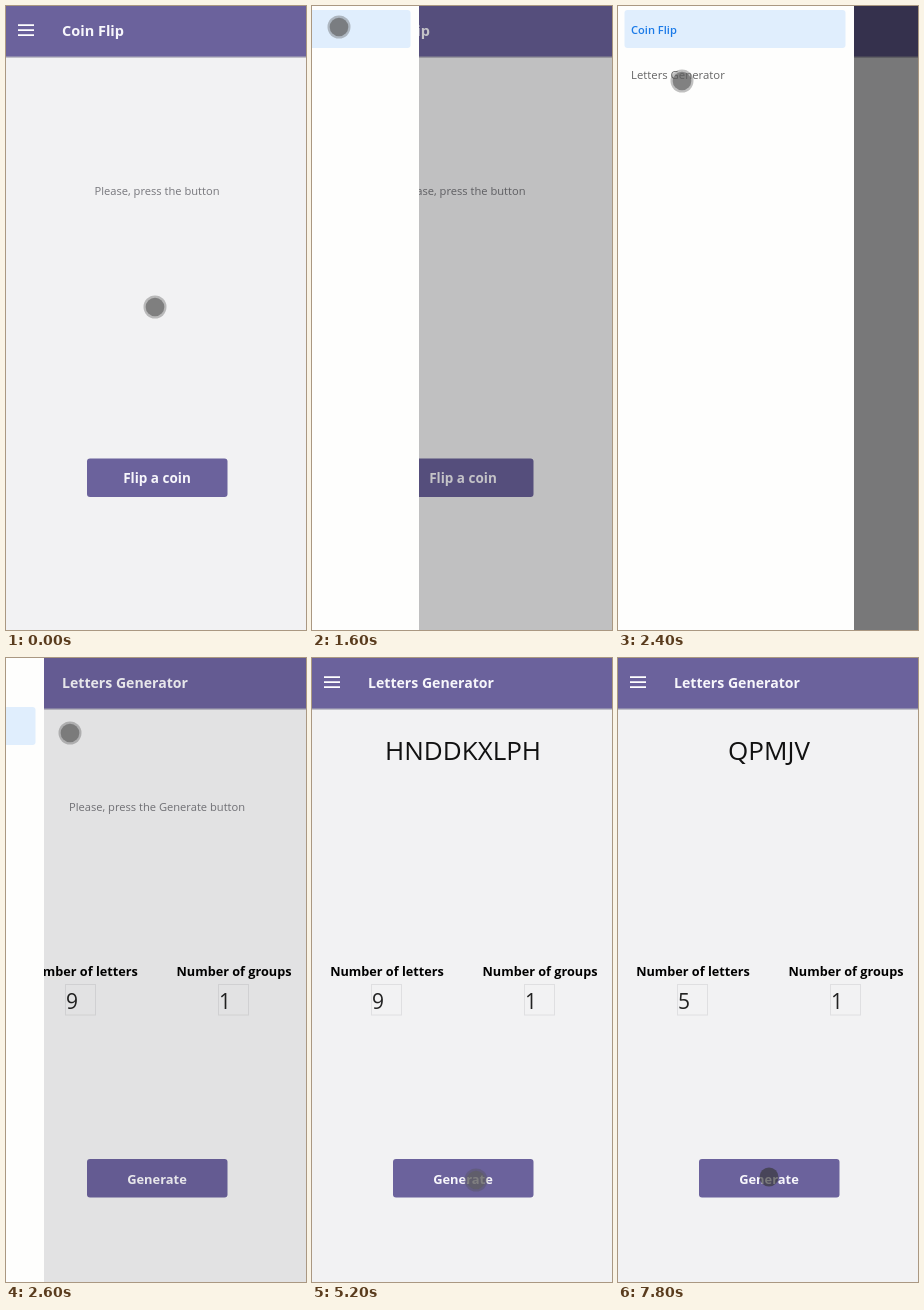
An HTML page that plays this animation: 300x624 px, repeating every 8000 ms.

```html
<!DOCTYPE html>
<html lang="en">
<head>
<meta charset="utf-8">
<title>Letters Generator</title>
<style>
  html, body { margin: 0; width: 100%; height: 100%; overflow: hidden; background: #f2f2f3; }
  svg { display: block; width: 300px; height: 624px; font-family: "Open Sans", "Noto Sans", sans-serif; }
  .bold { font-weight: 700; }
  .mid { text-anchor: middle; }
  .purple { fill: #6b629c; }
  .light { fill: #f7f6fb; }
  .hint { font-size: 11.15px; fill: #77777c; }
  .label { font-size: 12.7px; fill: #000; }
  .value { font-size: 21px; fill: #222; }
  .box { fill: none; stroke: #dfdfe1; }
  .item { font-size: 11.35px; fill: #666; }
  .item.active { font-size: 11.1px; font-weight: 600; fill: #1a7ae8; }
</style>
</head>
<body>
<svg viewBox="0 0 300 624">
  <rect width="300" height="624" fill="#f2f2f3"/>
  <rect y="50" width="300" height="1.8" fill="#b5b3c0"/>
  <rect class="purple" width="300" height="50.5"/>
  <path d="M12 19.2h16M12 24.2h16M12 29.2h16" stroke="#fff" stroke-width="1.8"/>
  <text id="title" class="bold light" x="56" y="30"></text>

  <g id="coinPage">
    <text class="hint mid" x="151" y="189">Please, press the button</text>
    <rect class="purple" x="81" y="452.5" width="140.5" height="38.5" rx="3"/>
    <text class="bold light mid" x="151" y="477" font-size="13.5">Flip a coin</text>
  </g>

  <g id="lettersPage">
    <text id="hint" class="hint mid" x="151" y="153">Please, press the Generate button</text>
    <text id="result" class="mid" x="151" y="102" font-size="26" fill="#111"></text>
    <text class="label bold mid" x="75" y="318">Number of letters</text>
    <text class="label bold mid" x="228" y="318">Number of groups</text>
    <rect class="box" x="59.5" y="326.5" width="30" height="30.5"/>
    <rect class="box" x="212.5" y="326.5" width="30" height="30.5"/>
    <text id="letters" class="value" x="60" y="351"></text>
    <text class="value" x="213" y="351">1</text>
    <rect id="focus" x="59.8" y="326.8" width="29.6" height="30" rx="2" fill="none" stroke="#eaa22e" stroke-width="1.7"/>
    <path id="caret" stroke="#222"/>
    <rect class="purple" x="81" y="501" width="140.5" height="38.5" rx="3"/>
    <text class="bold light mid" x="151" y="526" font-size="12.9">Generate</text>
  </g>

  <rect id="shade" width="300" height="624"/>
  <g id="drawer">
    <rect width="236" height="624" fill="#fefefd"/>
    <rect id="active" x="6.5" width="221" height="38" rx="3" fill="#e0eefd"/>
    <text id="coinItem" class="item" x="13" y="28">Coin Flip</text>
    <text id="lettersItem" class="item" x="13" y="73">Letters Generator</text>
  </g>

  <g id="pointer">
    <circle id="halo" r="11.5" fill="#535353" fill-opacity=".36"/>
    <circle id="dot" fill-opacity=".65"/>
  </g>
</svg>
<script>
const LOOP = 8000;
const DRAWER_WIDTH = 236;
const el = {};
document.querySelectorAll("[id]").forEach(node => el[node.id] = node);

// Pointer stops: time, x, y
const path = [
  [0, 149, 301], [500, 149, 301], [1350, 27, 21], [1750, 27, 21],
  [2200, 64, 75], [2800, 64, 75], [3550, 164, 522], [5250, 164, 522],
  [5950, 81, 343], [6800, 81, 343], [7350, 151, 519], [LOOP, 151, 519]
];
const presses = [
  [1380, 1500], [2220, 2360], [3580, 3750], [4150, 4350], [4560, 4750],
  [4960, 5150], [6000, 6150], [7380, 7550], [7750, 7950]
];
const results = [
  [0, ""], [3750, "XASLNTEBA"], [4350, "RCWMOUKDI"],
  [4750, "BTYFGASNE"], [5150, "HNDDKXLPH"], [7550, "QPMJV"]
];
const letterCounts = [[0, "9"], [6500, ""], [6750, "5"]];

const clamp = v => Math.max(0, Math.min(1, v));
const ramp = (t, from, to) => clamp((t - from) / (to - from));
const smooth = v => v * v * (3 - 2 * v);
const within = (t, from, to) => t >= from && t < to;
const latest = (steps, t) => steps.filter(step => step[0] <= t).pop()[1];
const show = (node, on) => node.setAttribute("visibility", on ? "visible" : "hidden");

function set(node, attributes) {
  for (const name in attributes) node.setAttribute(name, attributes[name]);
}

function pointerAt(t) {
  const next = path.findIndex(stop => stop[0] > t);
  const [t0, x0, y0] = path[next - 1];
  const [t1, x1, y1] = path[next];
  const k = smooth(ramp(t, t0, t1));
  return [x0 + (x1 - x0) * k, y0 + (y1 - y0) * k];
}

function drawDrawer(t, onLetters) {
  const closing = ramp(t, 2420, 2700);
  const open = smooth(ramp(t, 1480, 1738)) * (1 - closing) ** 1.75;
  set(el.drawer, { transform: `translate(${Math.round((open - 1) * DRAWER_WIDTH)} 0)` });
  set(el.shade, { opacity: 0.5 * open ** 1.1 });
  set(el.active, { y: onLetters ? 49 : 4 });
  el.coinItem.classList.toggle("active", !onLetters);
  el.lettersItem.classList.toggle("active", onLetters);
}

function drawPage(t, onLetters) {
  show(el.coinPage, !onLetters);
  el.lettersPage.style.display = onLetters ? "" : "none";
  el.title.textContent = onLetters ? "Letters Generator" : "Coin Flip";
  set(el.title, { "font-size": onLetters ? 14.1 : 14.5 });

  const result = latest(results, t);
  el.result.textContent = result;
  show(el.hint, !result);

  const count = latest(letterCounts, t);
  el.letters.textContent = count;
  const focused = within(t, 6100, 7400);
  show(el.focus, focused);
  show(el.caret, focused && (t - 6100) % 1000 < 500);
  set(el.caret, { d: `M${count ? 72.5 : 61.5} 329v26` });
}

function drawPointer(t) {
  const pressed = presses.some(([from, to]) => within(t, from, to));
  const [x, y] = pointerAt(t);
  set(el.pointer, { transform: `translate(${x} ${y})` });
  show(el.halo, !pressed);
  set(el.dot, pressed ? { r: 9.5, fill: "#363636" } : { r: 9.3, fill: "#606060" });
}

function render(t) {
  const onLetters = t >= 2420;
  drawPage(t, onLetters);
  drawDrawer(t, onLetters);
  drawPointer(t);
}

const start = performance.now();
function tick() {
  render((performance.now() - start) % LOOP);
  requestAnimationFrame(tick);
}
tick();
</script>
</body>
</html>
```
